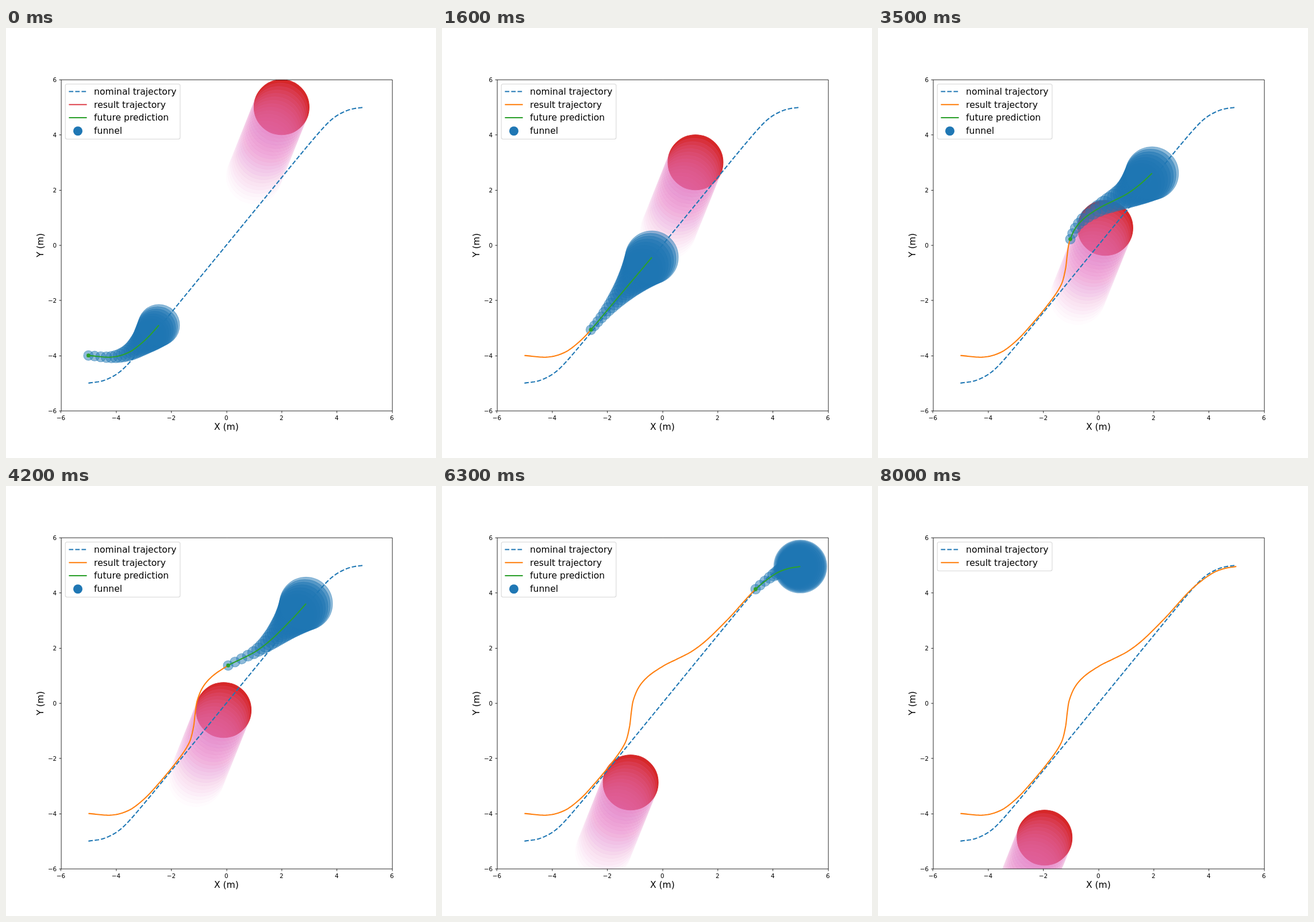
An HTML page with a canvas that plays this animation: 748 by 748 pixels, repeating every 8100 ms.

```html
<!DOCTYPE html>
<html lang="en">
<head>
<meta charset="utf-8">
<title>Trajectory funnel</title>
<style>
html, body { margin: 0; width: 100%; height: 100%; overflow: hidden; background: #fff; }
canvas { display: block; }
</style>
</head>
<body>
<canvas width="748" height="748"></canvas>
<script>
const ctx = document.querySelector('canvas').getContext('2d');
const BLUE = '#1f77b4', ORANGE = '#ff7f0e', GREEN = '#2ca02c', RED = '#d62728', PINK = '#dd73bd';
const STEP = 100, FRAMES = 81, LAST = FRAMES - 1;
const HORIZON = 17.2;   // length of the prediction, in steps
const RINGS = 24;       // funnel circles along the prediction
const REPLAN = 22;      // step at which the detour is planned
const SCALE = 0.748;    // the plot is laid out on a 1000 px grid
const LEFT = 96.1, RIGHT = 672.1, TOP = 90.1, BOTTOM = 666.1;

const px = x => 383.35 + 48 * x;
const py = y => 377.74 - 48 * y;
const snap = v => (Math.round(v / SCALE) + 0.5) * SCALE;

// Smooth curve through knots [t, x, y]
function spline(knots) {
  const last = knots.length - 1;
  const slope = (i, c) => {
    const a = knots[Math.max(i - 1, 0)], b = knots[Math.min(i + 1, last)];
    return (b[c] - a[c]) / (b[0] - a[0]);
  };
  return time => {
    const t = Math.min(Math.max(time, knots[0][0]), knots[last][0]);
    let i = 0;
    while (i < last - 1 && t > knots[i + 1][0]) i++;
    const a = knots[i], b = knots[i + 1], d = b[0] - a[0], u = (t - a[0]) / d, v = 1 - u;
    return [1, 2].map(c =>
      v * v * (1 + 2 * u) * a[c] + u * u * (3 - 2 * u) * b[c] +
      d * u * v * (v * slope(i, c) - u * slope(i + 1, c)));
  };
}

const approach = [[0, 143.4, 569.7], [4, 183, 572.5], [8, 213, 564.5], [12, 238, 546.5],
  [16, 259, 525], [REPLAN, 295, 482]];
const detour = spline([...approach, [27, 318.5, 447], [29.7, 326, 420], [32.4, 329.5, 392],
  [34.5, 333, 372], [37, 343, 349], [39.5, 360, 330], [42, 386.5, 312.2], [44.1, 410, 300.5],
  [46.4, 434, 288], [50, 461, 267.5], [55.6, 500, 229], [63, 545.5, 179.5], [67.2, 578, 154],
  [71.5, 600, 144.3], [79, 623.3, 140]]);
const direct = spline([...approach, [33.2, 365, 399], [39, 400, 357]]);

const bend = [[2.6, 3.18], [3.1, 3.78], [3.5, 4.24], [3.8, 4.54], [4.1, 4.75], [4.5, 4.92], [5, 5]];
const nominal = spline([...bend.map(([x, y]) => [-x, -y]).reverse(), [0, 0], ...bend]
  .map(([x, y]) => [x, px(x), py(y)]));

const sample = (curve, from, to, step) => {
  const points = [];
  for (let t = from; t < to; t += step) points.push(curve(t));
  points.push(curve(to));
  return points;
};
const nominalPoints = sample(nominal, -5, 5, 0.05);

function line(points, color, dash = []) {
  ctx.beginPath();
  points.forEach(p => ctx.lineTo(...p));
  ctx.strokeStyle = color;
  ctx.lineWidth = 2.08;
  ctx.lineJoin = 'round';
  ctx.setLineDash(dash);
  ctx.stroke();
  ctx.setLineDash([]);
}

function disc(x, y, r, color, alpha = 1, edge = 1.04) {
  ctx.globalAlpha = alpha;
  ctx.beginPath();
  ctx.arc(x, y, r, 0, 2 * Math.PI);
  ctx.fillStyle = color;
  ctx.fill();
  if (edge) {
    ctx.strokeStyle = color;
    ctx.lineWidth = edge;
    ctx.stroke();
  }
  ctx.globalAlpha = 1;
}

function text(s, x, y, size, align) {
  ctx.font = size + 'px "DejaVu Sans", sans-serif';
  ctx.textAlign = align;
  ctx.fillStyle = '#000';
  ctx.fillText(s, x, y);
}

function obstacle(n) {
  const i = Math.min(n, LAST - 1);
  const at = k => [px(2 - 0.05 * (i + k)), py(5 - 0.125 * (i + k))];
  disc(...at(0), 48, RED);
  for (let k = 1; k <= 20; k++) disc(...at(k), 48, PINK, 0.14 - 0.006 * k);
}

function prediction(n) {
  const curve = n < REPLAN ? direct : detour;
  const lift = n < REPLAN ? 0 : 5 * Math.max(0, 1 - Math.abs(n - 27) / 8);
  return k => {
    const [x, y] = curve(n + k);
    return [x, y - lift * (k / HORIZON) ** 2];
  };
}

// Circles grow along the prediction and stand closer together towards its end
function funnel(n, ahead) {
  const growth = 27.5 + 10 * Math.min(1, n / 16);
  for (let i = 0; i <= RINGS; i++) {
    const u = i / RINGS, s = u * (1.5 - 0.5 * u);
    disc(...ahead(s * HORIZON), 8.5 + growth * s * s, BLUE, 0.5);
  }
}

function axes() {
  ctx.strokeStyle = '#000';
  ctx.lineWidth = 0.83;
  ctx.strokeRect(LEFT, TOP, RIGHT - LEFT, BOTTOM - TOP);
  ctx.beginPath();
  for (let v = -6; v <= 6; v += 2) {
    const x = snap(px(v)), y = snap(py(v));
    const label = String(v).replace('-', '\u2212');
    ctx.moveTo(x, BOTTOM);
    ctx.lineTo(x, BOTTOM + 3.64);
    ctx.moveTo(LEFT, y);
    ctx.lineTo(LEFT - 3.64, y);
    text(label, px(v), 681.5, 10.39, 'center');
    text(label, 88.2, py(v) + 4, 10.39, 'right');
  }
  ctx.stroke();
  text('X (m)', 383.4, 699.3, 15.58, 'center');
  ctx.save();
  ctx.translate(65, 377.8);
  ctx.rotate(-Math.PI / 2);
  text('Y (m)', 0, 0, 15.58, 'center');
  ctx.restore();
}

function legend(n) {
  const rows = [['nominal trajectory', BLUE], ['result trajectory', n ? ORANGE : '#df4650'],
    ['future prediction', GREEN], ['funnel', BLUE]].slice(0, n < LAST ? 4 : 2);
  ctx.beginPath();
  ctx.roundRect(103.2, 97.5, 199.7, 4.7 + 22.75 * rows.length, 3);
  ctx.fillStyle = 'rgba(255,255,255,.8)';
  ctx.fill();
  ctx.strokeStyle = '#d6d6d6';
  ctx.lineWidth = 1.04;
  ctx.stroke();
  rows.forEach(([name, color], i) => {
    const y = 110.5 + 22.75 * i;
    if (i === 3) disc(125, y + 0.5, 8, color, 1, 0);
    else line([[109.4, y], [140.6, y]], color, i ? [] : [7.7, 3.33]);
    text(name, 153.1, y + 5.4, 15.58, 'left');
  });
}

function draw(n) {
  ctx.fillStyle = '#fff';
  ctx.fillRect(0, 0, 748, 748);
  ctx.save();
  ctx.beginPath();
  ctx.rect(LEFT, TOP, RIGHT - LEFT, BOTTOM - TOP);
  ctx.clip();
  const active = n < LAST, ahead = prediction(n);
  obstacle(n);
  if (active) funnel(n, ahead);
  line(nominalPoints, BLUE, [7.69, 3.33]);
  if (n) line(sample(detour, 0, n, 0.25), ORANGE);
  if (active) {
    line(sample(ahead, 0, HORIZON, 0.25), GREEN);
    disc(...ahead(0), 3.4, GREEN, 1, 0);
  }
  ctx.restore();
  axes();
  legend(n);
}

function tick() {
  draw(Math.floor(performance.now() / STEP) % FRAMES);
  requestAnimationFrame(tick);
}
tick();
</script>
</body>
</html>
```
